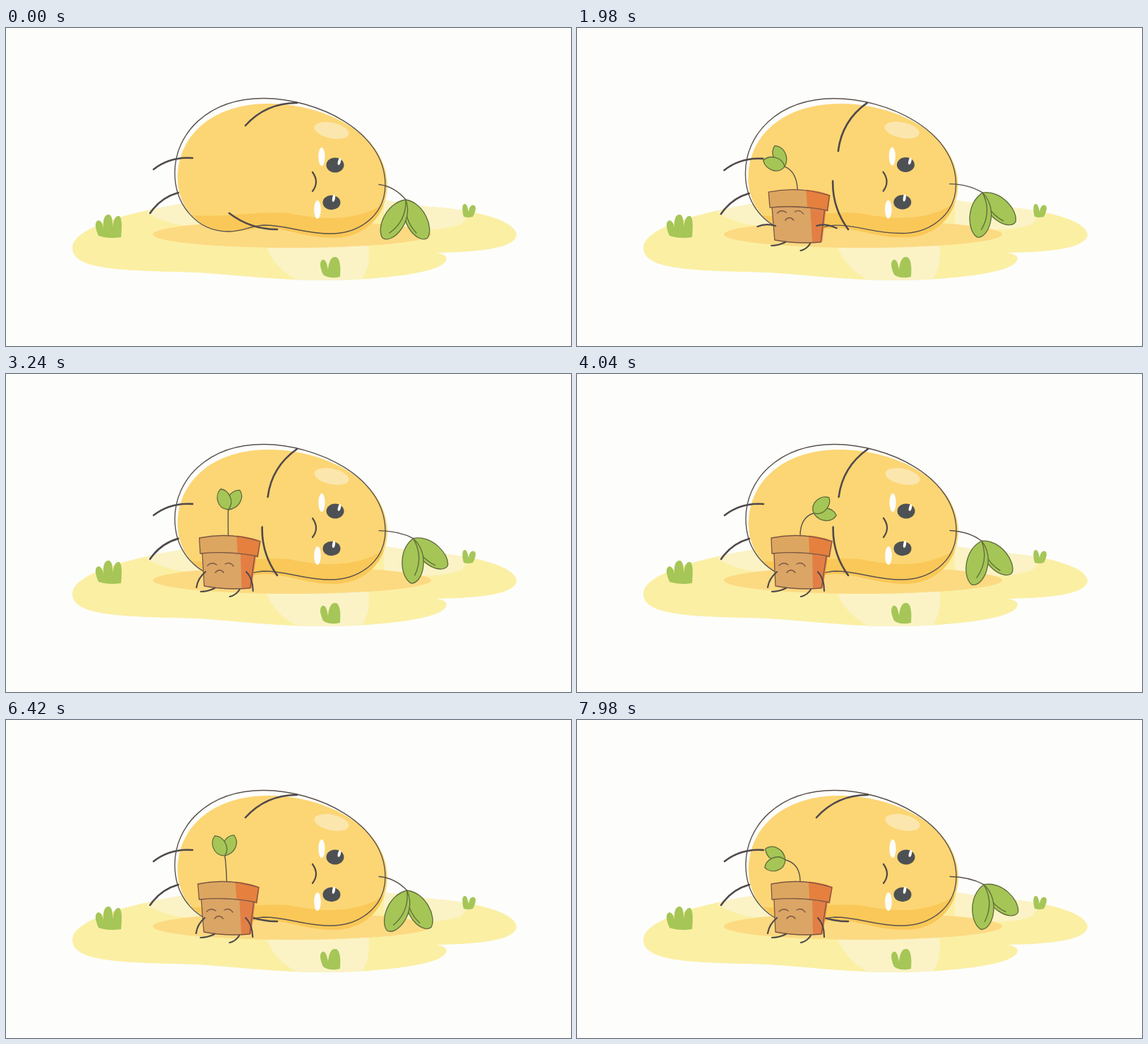
An HTML page for the animation above (8000 ms loop, 800 by 450 pixels).

```html
<!DOCTYPE html>
<html lang="en">
<head>
<meta charset="utf-8">
<title>Sleepy bean</title>
<style>
html, body { margin: 0; width: 100%; height: 100%; overflow: hidden; background: #fdfdfb; }
svg { display: block; width: 100%; height: 100%; }
.line { fill: none; stroke: #5a524c; stroke-width: 1.4; stroke-linecap: round; }
.limb { fill: none; stroke: #50494a; stroke-width: 2.6; stroke-linecap: round; }
.short { fill: none; stroke: #50494a; stroke-width: 2.2; stroke-linecap: round; }
.leaf { fill: #a5c656; stroke: #5f6a3a; stroke-width: 1.3; stroke-linejoin: round; }
.rib { fill: none; stroke: #5f6a3a; stroke-width: 1.3; stroke-linecap: round; }
.grass { fill: #a6c657; }
.glow { fill: #fbf3c6; }
.edge { fill: none; stroke: #7c5642; stroke-width: 1.3; stroke-linejoin: round; }
.face { fill: none; stroke: #7c5642; stroke-width: 1.4; stroke-linecap: round; }
</style>
</head>
<body>
<svg viewBox="0 0 800 450">
  <rect width="800" height="450" fill="#fdfdfb"/>

  <clipPath id="lawn"><path id="ground" d="M94 312C92 292 135 272 200 258C330 228 520 235 580 252C640 253 720 268 723 292C722 312 670 317 610 318C622 320 626 325 623 329C615 350 500 358 440 357C380 356 330 350 270 346C180 343 95 345 94 312Z"/></clipPath>
  <use href="#ground" fill="#fbefa4"/>
  <g clip-path="url(#lawn)">
    <path class="glow" d="M200 240H275V282Q225 278 200 262ZM535 240H640Q662 262 644 278Q600 292 535 280ZM367 304H513Q518 340 500 360H420Q378 342 367 304Z"/>
  </g>
  <ellipse cx="405" cy="292" rx="197" ry="19" fill="#fcda82"/>
  <path class="grass" d="M131 294C127 285 125 276 129 273C133 270 137 276 138 283C137 270 140 264 145 264C150 264 151 272 151 282C152 270 156 265 160 266C165 268 164 285 163 296C150 298 140 297 131 294Z"/>
  <path class="grass" d="M449 349C445 340 443 331 448 328C453 326 455 336 456 342C457 331 460 323 467 324C474 326 474 342 473 352C465 354 455 354 449 349Z"/>
  <path class="grass" d="M648 267C646 260 645 250 649 249C653 248 654 256 655 260C656 253 659 249 663 251C667 253 664 262 661 267Q655 269 648 267Z"/>

  <g id="bean">
    <clipPath id="skin"><path id="fill" d="M243 208C245 152 292 107 372 107C450 107 541 150 540 225C538 267 507 297 465 297C425 297 400 284 368 283C348 283 336 289 315 288C272 286 241 252 243 208Z"/></clipPath>
    <use href="#fill" fill="#fcd674"/>
    <path clip-path="url(#skin)" fill="#fac858" d="M240 262C300 272 350 258 400 262C450 272 500 276 545 242V305H240Z"/>
    <path class="line" d="M239 205C239 150 285 99.5 365 99.5C440 100 537 145 537 222C537 265 500 291 460 291C420 291 400 279 365 279C345 280 335 288 315 288C270 288 239 250 239 205Z"/>
    <ellipse cx="461" cy="145" rx="25" ry="11" transform="rotate(12 461 145)" fill="#fbe6ae"/>
    <ellipse cx="447" cy="182" rx="4.6" ry="13" fill="#fdfdfb"/>
    <ellipse cx="441" cy="257" rx="4.8" ry="13" fill="#fdfdfb"/>
    <g id="eyeA">
      <ellipse rx="12.5" ry="10.5" fill="#4e5153"/>
      <ellipse cx="6" cy="-5" rx="2" ry="5" transform="rotate(15 6 -5)" fill="#fdfdfb"/>
    </g>
    <g id="eyeB">
      <ellipse rx="12.5" ry="10.2" fill="#4e5153"/>
      <ellipse cx="3" cy="-6" rx="2" ry="5" transform="rotate(10 3 -6)" fill="#fdfdfb"/>
    </g>
    <path class="short" d="M434 204Q444 218 434 231"/>
    <path class="limb" d="M209 200Q232 182 264 184M204 262Q219 240 244 233"/>
    <path id="armA" class="limb" d="M339 138Q368 106 412 106"/>
    <path id="armB" class="limb" d="M316 262Q346 285 384 285"/>
    <path id="stalk" class="line"/>
    <g id="leaves">
      <g id="leafR">
        <path class="leaf" d="M0 0C26 4 40 40 31 54C18 64 -12 32 0 0Z"/>
        <path class="rib" d="M0 0Q-3 28 15 47"/>
      </g>
      <g id="leafL">
        <path class="leaf" d="M0 0C-28 4 -42 40 -33 54C-20 64 12 32 0 0Z"/>
        <path class="rib" d="M0 0Q1 30 -23 47"/>
      </g>
    </g>
  </g>

  <g id="seedling">
    <path id="stem" class="line"/>
    <g id="sprout">
      <path class="leaf" d="M0 0C-7 -14 4 -28 16 -28C23 -18 16 -2 0 0Z"/>
      <path class="leaf" d="M0 0C-16 -1 -20 -20 -11 -29C0 -28 10 -12 0 0Z"/>
    </g>
  </g>
  <ellipse id="drop" cx="311" rx="16.5" ry="27" fill="#dba662"/>

  <g id="pot">
    <path fill="#dba566" d="M279 249L281 300Q312 306 347 303L355 252Z"/>
    <path fill="#e37f45" d="M333 249L334 304L348 303L356 252Z"/>
    <path fill="#dda660" d="M275 232Q318 223 361 237L358 259Q318 250 276 254Z"/>
    <path fill="#e5803f" d="M328 228.5Q346 230 362 236L358 260Q346 255 329 253Z"/>
    <path class="edge" d="M279 254L281 300Q312 306 346 303L353 258M275 232Q318 223 361 237L357 258Q318 250 276 254Z"/>
    <path id="face" class="face" d="M286 271Q292 265 299 270M311 269Q318 265 323 272M297 281Q303 274 309 281"/>
    <path id="potArmA" class="short" d="M283 280Q272 289 270 302"/>
    <path id="potArmB" class="short" d="M341 280Q350 289 350 307"/>
    <path class="short" d="M296 303Q286 308 276 308M331 305Q326 313 317 315"/>
  </g>
</svg>
<script>
const LOOP = 8000;
const FALL = 320, LAND = 1520;
const HOP = 260, HOP_LAND = 2500, HOP_HEIGHT = 110;
const { sin, cos, exp, PI, abs } = Math;
const el = {};
document.querySelectorAll('[id]').forEach(n => el[n.id] = n);

const clamp = x => Math.min(1, Math.max(0, x));
const ease = (t, a, b) => { const p = clamp((t - a) / (b - a)); return p * p * (3 - 2 * p); };
const set = (n, attr, v) => el[n].setAttribute(attr, v);
const move = (n, v) => set(n, 'transform', v);
const show = (n, on) => set(n, 'visibility', on ? 'visible' : 'hidden');

// Damped wobble in degrees after a landing
const jolt = since => since > 0 ? 3 * exp(-since / 350) * sin(2 * PI * since / 500) : 0;

function drawBean(t) {
  move('bean', `rotate(${jolt(t - LAND) + jolt(t - HOP_LAND)} 391 285)`);

  const lift = ease(t, 550, 1680) - ease(t, 4450, 5620);
  move('armA', `rotate(${-35 * lift} 412 106)`);
  move('armB', `rotate(${54 * lift} 384 285)`);

  const open = 0.1 + 0.9 * clamp(abs(t - 5400) / 130);
  move('eyeA', `translate(466 194) scale(${open} 1)`);
  move('eyeB', `translate(461 247) scale(${open} 1)`);

  const sway = 0.5 - 0.5 * cos(2 * PI * t / 5680);
  const x = 566 + 11 * sway, y = 243 - 11 * sway;
  set('stalk', 'd', `M528 221.5Q${550 + 8 * sway} ${224 - 2 * sway} ${x} ${y}`);
  move('leaves', `translate(${x} ${y})`);
  move('leafL', `rotate(${-30 * sway})`);
  move('leafR', `rotate(${-23 * sway})`);
}

function drawPot(t) {
  const hit = t - LAND, down = hit >= 0;
  const fall = clamp((hit + FALL) / FALL);
  const cy = -80 + 348 * fall * fall;
  show('drop', !down);
  show('pot', down);
  show('seedling', fall > 0);
  set('drop', 'cy', cy);

  const p = clamp((t - HOP_LAND + HOP) / HOP);
  const hop = HOP_HEIGHT * 4 * p * (1 - p);
  const tilt = 1.4 * (1 - cos(2 * PI * (t - 4040) / 3940));
  const bounce = down ? exp(-hit / 150) * cos(hit / 60) : 0;
  const pose = `translate(${314 - tilt / 3} ${303 - hop}) skewX(${tilt * 0.8}) scale(${1 + 0.22 * bounce} ${1 - 0.25 * bounce}) translate(-314 -303)`;
  move('pot', pose);
  move('seedling', down ? pose + ' translate(316 229)' : `translate(311 ${cy - 23})`);

  const splay = 1 - ease(t, 2540, 3250);
  move('face', `translate(0 ${-9 * splay})`);
  move('potArmA', `rotate(${57 * splay} 283 280)`);
  move('potArmB', `rotate(${-65 * splay} 341 280)`);

  const amp = clamp(0.45 + 0.35 * (t - 1420) / 1120);
  const a = amp * PI / 2 * sin(PI * (t - 3225) / 3150);
  const x = 21 * sin(a), y = -37 + 6 * sin(a) ** 2;
  set('stem', 'd', `M0 0Q0 -26 ${x} ${y}`);
  move('sprout', `translate(${x} ${y}) rotate(${a * 180 / PI})`);
}

const start = performance.now();
function tick() {
  const t = (performance.now() - start) % LOOP;
  drawBean(t);
  drawPot(t);
  requestAnimationFrame(tick);
}
tick();
</script>
</body>
</html>
```
